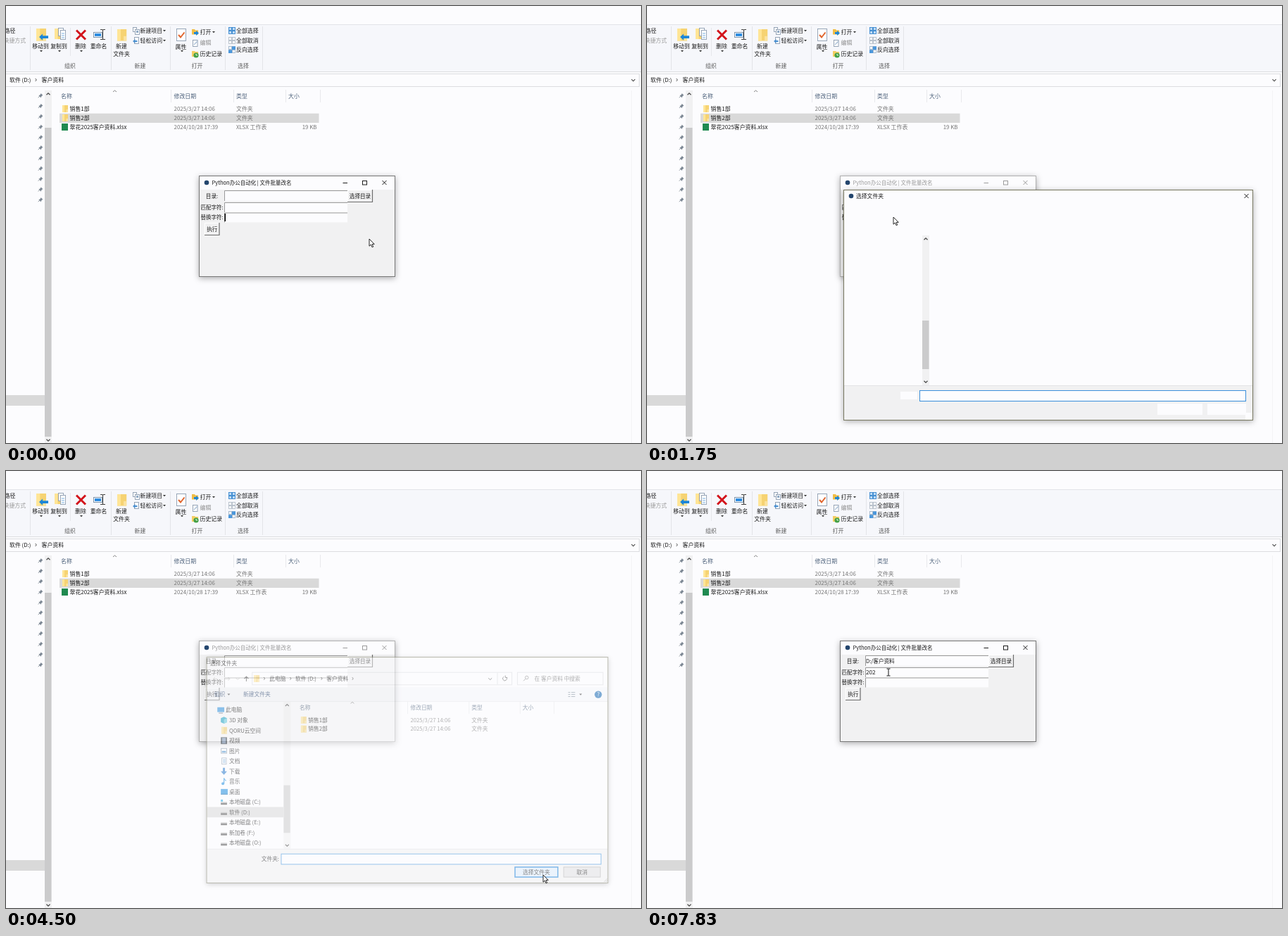
Animation of 902 by 621 pixels, one loop 8000 ms. Source, as an HTML page:

```html
<!DOCTYPE html>
<html lang="zh-CN">
<head>
<meta charset="utf-8">
<title>文件批量改名</title>
<style>
html, body { margin: 0; width: 100%; height: 100%; overflow: hidden; background: #fcfcfe; }
svg { display: block; width: 902px; height: 621px; }
text { font-family: "Noto Sans CJK SC", "Noto Sans CJK", "Noto Sans", sans-serif; white-space: pre; }
.shadow { filter: drop-shadow(0 2px 4px rgba(0, 0, 0, .32)); }
</style>
</head>
<body>
<svg id="stage" viewBox="0 0 902 621" xmlns="http://www.w3.org/2000/svg"></svg>
<script>
const LOOP = 8000, FPS = 12;
const WHITE = '#fcfcfe', INK = '#1b1b1b', GREY = '#757575', HEAD = '#4c607a',
      PANEL = '#f1f1f2', LINE = '#dcdde0', BLUE = '#1c86d8', PICKED = '#d9d9d9';

const rect = (x, y, w, h, fill, stroke = 'none', extra = '') =>
  `<rect x="${x}" y="${y}" width="${w}" height="${h}" fill="${fill}" stroke="${stroke}" ${extra}/>`;
const path = (d, stroke, width = 1, fill = 'none') =>
  `<path d="${d}" stroke="${stroke}" stroke-width="${width}" fill="${fill}"/>`;
const solid = (d, fill) => path(d, 'none', 0, fill);
const dot = (x, y, r, fill) => `<circle cx="${x}" cy="${y}" r="${r}" fill="${fill}"/>`;
// y is the visual middle of the line
const text = (x, y, s, fill = INK, size = 7.9, anchor = 'start') =>
  `<text x="${x}" y="${y + 2.9}" fill="${fill}" font-size="${size}" text-anchor="${anchor}">${s}</text>`;
const mid = (x, y, s, fill, size) => text(x, y, s, fill, size, 'middle');
const group = (id, body, cls = '') => `<g id="${id}" class="${cls}">${body}</g>`;
const vline = (x, y1, y2, color = LINE) => rect(x, y1, 1, y2 - y1, color);
const drop = (x, y, c = '#333') => solid(`M${x - 2} ${y - 1}h4l-2 2.2z`, c);
const chevron = (x, y, dx, dy, c = '#555', w = 1) =>
  path(dx ? `M${x - dx} ${y - 2}l${2 * dx} 2l${-2 * dx} 2` : `M${x - 2.5} ${y - dy}l2.5 ${2 * dy}l2.5 ${-2 * dy}`, c, w);
const cross = (x, y, r, c, w = 1) => path(`M${x - r} ${y - r}l${2 * r} ${2 * r}M${x + r} ${y - r}l${-2 * r} ${2 * r}`, c, w);
const folder = (x, y, k = 1) =>
  `<g transform="translate(${x} ${y}) scale(${k})">${rect(0, 0, 8, 10, '#f6d373')}${rect(0, 0, 3, 10, '#ffe596')}${rect(5.5, 6, 2.5, 4, '#fbe3a0')}</g>`;
const sheet = (x, y, w, h) => rect(x + .5, y + .5, w, h, '#fff', '#8d9cb0', 'stroke-width=".9"');

function scrollbar(x, top, bottom, thumbTop, thumbBottom) {
  return rect(x, top, 10, bottom - top, PANEL) + rect(x, thumbTop, 9.5, thumbBottom - thumbTop, '#cbcbcc') +
    chevron(x + 5, top + 5, 0, -1.2, '#444', 1.2) + chevron(x + 5, bottom - 5, 0, 1.2, '#444', 1.2);
}

function columns(dx, dy) {
  const heads = [[78, '名称'], [238.5, '修改日期'], [327, '类型'], [401, '大小']];
  return heads.map(([x, s]) => text(x + dx, 128 + dy, s, HEAD)).join('') +
    [234, 323, 397, 446].map(x => vline(x + dx, 119 + dy, 137 + dy, '#e8e9ec')).join('') +
    chevron(154.5 + dx, 121 + dy, 0, -1, '#777', .9);
}

function fileRow(dx, y, name, date, kind, size = '', isFolder = true) {
  return (isFolder ? folder(80 + dx, y - 5) : rect(79 + dx, y - 5, 9, 10, '#1f8a50')) +
    text(90.5 + dx, y, name) + text(238.5 + dx, y, date, GREY) +
    text(327 + dx, y, kind, GREY) + text(441.5 + dx, y, size, GREY, 7.9, 'end');
}
const folders = (dx, dy) => ['销售1部', '销售2部']
  .map((n, i) => fileRow(dx, 146 + dy + 13 * i, n, '2025/3/27 14:06', '文件夹')).join('');

function ribbon() {
  const grid = (x, y, c, fill) => [0, 1].map(i => [0, 1].map(j =>
    rect(x + i * 5 + .5, y + j * 5 + .5, 4, 4, fill, c, 'stroke-width=".9"')).join('')).join('');
  const icons =
    folder(43, 32, 1.75) + solid('M47 44l5-4.5v2.7h8v3.8h-8v2.7z', BLUE) +
    folder(69, 32, 1.5) + sheet(74, 31, 7, 11) + sheet(77, 34, 7, 13) +
    path('M79 39h4m-4 3h4m-4 3h4', '#6aa5dc', .9) +
    cross(106.5, 41, 6.5, '#d3141c', 3) +
    rect(124.5, 37.5, 12, 7, '#fff', '#7b93ab') + rect(126, 39, 9, 4, '#2c8be0') +
    path('M134 33.5h2.5q1 0 1 1v12q0 1-1 1H134M141 33.5h-2.5q-1 0-1 1m0 12q0 1 1 1H141', '#444', 1.1) +
    folder(158, 33, 1.65) +
    sheet(180, 30, 5, 6) + sheet(183, 33, 6, 7) + rect(185, 35, 3, 3, '#8fa9c4') +
    sheet(182, 44, 6, 9) + solid('M180 50l3.5-3v2h3v2h-3v2z', '#4a8fd0') +
    sheet(242, 32, 13, 17) + path('M245 41l3 3.5l5.5-7', '#e0642c', 2) +
    solid('M264 33h4l1 1.5h4v6h-9z', '#f0bd45') + solid('M267 40v-3h3v-2l4 3.5l-4 3.5v-2z', BLUE) +
    sheet(265, 48, 6.5, 9) + path('M267 55l5-5', '#a6bcd5', 1.3) +
    solid('M264 64h4l1 1h4v7h-9z', '#f3ce63') + dot(270, 70, 3.6, '#43a047') + path('M270 68v2h2', '#fff', .9) +
    grid(316, 30, '#3987cf', '#bfdcf5') + grid(316, 44, '#b4bdc8', '#fff') +
    grid(316, 57, '#9eb3c8', '#fff') + rect(321, 57.5, 5, 4.5, '#4b97dc') + rect(316, 62.5, 5, 4.5, '#4b97dc');
  const centred = [[49, 57, '移动到'], [75, 57, '复制到'], [106, 57, '删除'], [131.5, 57, '重命名'],
    [164, 57, '新建'], [164, 68, '文件夹'], [248.5, 58, '属性']];
  const sided = [[190.5, 35, '新建项目'], [190.5, 49, '轻松访问'], [275.5, 37, '打开'], [275.5, 68, '历史记录'],
    [327, 35, '全部选择'], [327, 49, '全部取消'], [327, 62, '反向选择'], [-2.5, 35, '路径']];
  return rect(0, 26, 902, 67, '#f6f7fb') + rect(0, 26, 902, 1, '#e2e3e8') + rect(0, 93, 902, 1, LINE) +
    [34, 149, 233, 311, 364].map(x => vline(x, 29, 91, '#e3e4e8')).join('') + vline(91, 31, 71, '#e6e7eb') + icons +
    centred.map(([x, y, s]) => mid(x, y, s)).join('') + sided.map(([x, y, s]) => text(x, y, s)).join('') +
    text(-3.5, 49, '快捷方式', '#9a9a9a') + text(275.5, 52, '编辑', '#8c8c8c') +
    [[91, '组织'], [190.5, '新建'], [271.5, '打开'], [337, '选择']].map(([x, s]) => mid(x, 85, s, '#5c5c5c')).join('') +
    [[50, 64], [76, 64], [107, 64], [250, 64], [225, 35], [225, 49], [295, 37]].map(([x, y]) => drop(x, y)).join('');
}

function explorer() {
  let pins = '';
  for (let i = 0; i < 11; i++) {
    const y = 127 + 14.8 * i;
    pins += solid(`M49.5 ${y - 3}l3 3l-1 .3l-1.5 1.7l-.3 1.5l-3.4-3.4l1.5-.3l1.6-1.8z`, '#7d8894') + path(`M47.8 ${y + 1.2}l-2 2`, '#7d8894', .9);
  }
  return ribbon() +
    rect(-1, 96.5, 900.5, 18, WHITE, LINE) + text(5, 105, '软件 (D:)') + chevron(42.5, 105, .9, 0) +
    text(50.5, 105, '客户资料') + chevron(891, 105.5, 0, 1.3, '#444', 1.1) +
    pins + rect(0, 553, 55, 15, PICKED) + scrollbar(55, 120, 622, 173, 612) + vline(888, 120, 621, '#f3f3f6') +
    columns(0, 0) + rect(76, 152.7, 368.5, 13.3, PICKED) + folders(0, 0) +
    fileRow(0, 172, '翠花2025客户资料.xlsx', '2024/10/28 17:39', 'XLSX 工作表', '19 KB', false);
}

function titleBar(id, color, border) {
  return group(id, rect(274.5, 241.5, 278, 143, 'none', border) +
    text(292.5, 251, 'Python办公自动化 | 文件批量改名', color, 7.5) +
    path('M478.5 251.5h6.5', color) + rect(506.5, 248.5, 6, 5.5, 'none', color) + cross(537.5, 251, 3, color));
}
function tkButton(id, x, y, w, h, label) {
  return rect(x, y, w, h, PANEL) +
    group(id, path(`M${x + .5} ${y + h}V${y + .5}H${x + w}`, '#fff') + path(`M${x} ${y + h - .5}H${x + w - .5}V${y}`, '#6d6d6d', 1.2)) +
    mid(x + w / 2, y + h / 2 - .2, label, INK, 7.6);
}
function toolWindow() {
  const entry = (y, h) => rect(310, y, 175, h, WHITE) + path(`M310.5 ${y + h}V${y + .5}H485`, '#9a9a9a');
  return rect(274, 241, 279, 144, PANEL, 'none', 'class="shadow"') + rect(275, 242, 277, 19, WHITE) +
    dot(285, 251, 3.3, '#24466e') + titleBar('titleOn', INK, '#777') + titleBar('titleOff', '#9b9b9b', '#b0b0b0') +
    entry(262, 15) + entry(279, 14) + entry(293.5, 14) +
    mid(292.5, 270, '目录:', INK, 7.6) + text(308.5, 286, '匹配字符:', INK, 7.5, 'end') + text(308.5, 300, '替换字符:', INK, 7.5, 'end') +
    tkButton('pick', 485, 261, 36, 18, '选择目录') + tkButton('run', 282, 308, 21.5, 18, '执行') +
    group('dir', text(311, 270, 'D:/客户资料', INK, 7.6)) +
    '<text id="typed" x="311" y="289" font-size="8.2" fill="#1b1b1b"></text>' +
    rect(310.5, 295, 1.5, 11, '#000', 'none', 'id="caretLow"') + rect(310.5, 281, 1.3, 11, '#000', 'none', 'id="caretTop"');
}

function tree() {
  const names = ['此电脑', '3D 对象', 'QORU云空间', '视频', '图片', '文档', '下载', '音乐', '桌面',
    '本地磁盘 (C:)', '软件 (D:)', '本地磁盘 (E:)', '新加卷 (F:)', '本地磁盘 (O:)'];
  const disk = rect(0, 1, 9, 3, '#4b4b4b') + rect(0, 0, 9, 1.5, '#b3b3b3');
  const icons = [
    rect(-5, -4, 10, 7, '#2f95e3') + rect(-3, 4, 6, 1, '#667'),
    solid('M4.5-5l4.5 2v6l-4.5 2l-4.5-2v-6z', '#1aa5c9') + solid('M4.5-1l4.5-2v6l-4.5 2z', '#68d0e4'),
    folder(1, -5),
    rect(0, -5, 9, 10, '#414b57') + rect(2, -4, 5, 8, '#7f99bb'),
    rect(.5, -3.5, 8, 7, '#fff', '#8a98a8') + rect(1.5, 0, 6, 2.5, '#4a91cc'),
    sheet(1, -5, 6.5, 9) + path('M3-2h4m-4 2h4m-4 2h4', '#5d9bd3', .9),
    solid('M3-5h3v5h3l-4.5 5l-4.5-5h3z', '#2578cc'),
    dot(3, 3, 2, '#178be0') + path('M4.6 3v-8q0 2 3 4', '#178be0', 1.2),
    rect(0, -4, 10, 8, '#178bdf') + rect(0, 3, 10, 1, '#0b5ca1'),
    disk + rect(0, -3.5, 3, 3, '#20a8e2'), disk, disk, disk, disk];
  return rect(280, 478.5, 111, 15, PICKED) + names.map((n, i) => {
    const y = 338 + 14.8 * i;
    return `<g transform="translate(300 ${y})">${icons[i]}</g>` + text(i ? 312 : 307, y, n);
  }).join('');
}

function dialogContent() {
  const NAVY = '#23406c';
  return path('M295 293h-6m2.5-2.5l-2.5 2.5l2.5 2.5M306 293h7m-2.5-2.5l2.5 2.5l-2.5 2.5', '#c6c6c6') +
    chevron(324.5, 293, 0, .8, '#c6c6c6') + path('M337 296.5v-7m-3 3l3-3l3 3', '#555', 1.1) +
    rect(345.5, 283.5, 376, 18, WHITE, LINE) + vline(700, 284, 301) + folder(348, 287.5) +
    [[363, 0], [401, 0], [446, 0], [491, 0]].map(([x]) => chevron(x, 292.5, .8, 0)).join('') +
    text(370.5, 292.5, '此电脑') + text(408, 292.5, '软件 (D:)') + text(453, 292.5, '客户资料') +
    chevron(690, 293, 0, 1.2) + path('M713.5 290.5a3 3 0 1 1-3.5-.8M712 288v3h3', '#555', .9) +
    rect(729.5, 283.5, 124, 18, WHITE, LINE) +
    '<circle cx="743" cy="291" r="2.3" fill="none" stroke="#777" stroke-width=".8"/>' + path('M741.3 292.8l-3 3', '#777', .9) +
    text(754, 292.5, '在 客户资料 中搜索', '#6c6c6c') +
    rect(280, 305, 581, 20, '#f6f7fb') + rect(280, 325, 581, 1, '#e4e5e9') +
    text(290.5, 315.5, '组织', NAVY) + drop(311.5, 315.5) + text(332.5, 315.5, '新建文件夹', NAVY) +
    path('M803 312.5h3m1.5 0h5.5M803 315.5h3m1.5 0h5.5M803 318.5h3m1.5 0h5.5', '#7c8b9a') + drop(821, 315.5) +
    dot(846.5, 315.5, 5.3, '#0c63b0') + mid(846.5, 315.5, '?', '#fff', 8) +
    columns(336, 206.5) + rect(412, 346, 368.5, 13, '#e5f3ff', 'none', 'id="hover"') + folders(336, 206.5) + tree();
}

function dialog() {
  const button = (x, w, s, id, fill, stroke, sw) =>
    rect(x, 565.5, w, 14.5, fill, stroke, `id="${id}" stroke-width="${sw}"`) + mid(x + w / 2, 573, s);
  return group('dialog',
    rect(279, 261, 582, 327.5, WHITE, 'none', 'class="shadow"') +
    group('dialogBadge', dot(290, 270, 3.3, '#24466e') + cross(851.5, 270, 3, INK)) +
    '<text id="dialogTitle" y="272.9" font-size="7.8" fill="#1b1b1b">选择文件夹</text>' +
    group('content', dialogContent()) +
    scrollbar(391, 326, 539, 447, 516) + rect(280, 539.5, 581, 48.5, PANEL) + rect(280, 539, 581, 1, '#e3e3e6') +
    rect(387.5, 546.5, 463, 15, WHITE, '#3a8fdb') + rect(389, 548, 1, 10, '#000', 'none', 'id="caretBox"') +
    group('blanks', rect(360, 548, 24, 11, WHITE) + rect(725, 565, 64, 16, WHITE) + rect(796, 565, 55, 16, WHITE) + rect(850, 578, 11, 10, WHITE)) +
    group('buttons', text(384.5, 554, '文件夹:', INK, 7.9, 'end') +
      button(726, 62, '选择文件夹', 'accept', '#e1e1e2', '#1a80d8', 1.6) + button(796.5, 53, '取消', 'cancel', '#e1e1e2', '#b0b0b0', 1) +
      path('M855 587l5-5m-2.5 5l2.5-2.5', '#b5b5b5')) +
    rect(279.5, 261.5, 581, 327, 'none', '#77775f'));
}

function pointers() {
  return group('cursor',
    group('arrow', path('M0 0V10.2L2.4 8L4.1 11.8L5.7 11.1L4.1 7.4H7.2Z', '#111', .9, '#fff')) +
    group('busy', '<circle r="4.6" fill="none" stroke="#1d80d6" stroke-width="3"/>' +
      '<path id="spark" d="M0-4.6A4.6 4.6 0 0 1 4.6 0" fill="none" stroke="#7cc4f5" stroke-width="2"/>') +
    group('beam', path('M-2.5-5h2q.5 0 .5.5v9q0 .5-.5.5h-2M2.5-5h-2q-.5 0-.5.5m0 9q0 .5.5.5h2', '#111')));
}

const stage = document.getElementById('stage');
stage.innerHTML = explorer() + toolWindow() + dialog() + pointers();
const el = Object.fromEntries([...stage.querySelectorAll('[id]')].map(n => [n.id, n]));

// time, x, y of the pointer's hot spot
const route = [[0, 516, 331], [750, 497, 273], [1000, 497, 273], [1420, 350, 300], [1750, 350, 300],
  [2330, 560, 364], [2830, 689, 480], [3170, 672, 360], [3420, 640, 293], [3500, 640, 293],
  [4250, 763, 574], [4660, 763, 574], [5080, 344, 299], [5330, 343, 286], [LOOP, 343, 286]];
// time, opacity, scale of the folder dialog
const fades = [[0, 0, .94], [1580, .4, .96], [1670, .85, .99], [1750, 1, 1], [4420, .82, .992], [4500, .52, .981], [4580, .18, .968], [4670, 0, .96]];

const between = (t, ...spans) => spans.some(([a, b]) => t >= a && t < b);
const show = (node, on) => node.setAttribute('display', on ? 'inline' : 'none');

function pointerAt(t) {
  const i = Math.max(1, route.findIndex(k => k[0] > t));
  const [t0, x0, y0] = route[i - 1], [t1, x1, y1] = route[i];
  const p = (t - t0) / (t1 - t0), e = p * p * (3 - 2 * p);
  return [x0 + (x1 - x0) * e, y0 + (y1 - y0) * e];
}

function render(time) {
  // the screen refreshes twelve times a second
  const t = Math.floor((time + 4) * FPS / 1000) * 1000 / FPS + 4;
  const [x, y] = pointerAt(Math.min(t - 4, LOOP - 1));
  const [, opacity, scale] = fades.filter(k => k[0] <= t).pop();

  el.cursor.setAttribute('transform', `translate(${x} ${y})`);
  const busy = between(t, [830, 1580]), beam = t >= 5170;
  show(el.busy, busy);
  show(el.beam, beam);
  show(el.arrow, !busy && !beam);
  el.spark.setAttribute('transform', `rotate(${t * .36})`);

  const active = !between(t, [1250, 4670]);
  show(el.titleOn, active);
  show(el.titleOff, !active);
  show(el.pick, !between(t, [670, 830]));
  show(el.dir, t >= 5170);
  el.typed.textContent = '202'.slice(0, [7420, 7580, 7830].filter(k => t >= k).length);
  show(el.caretLow, between(t, [0, 580], [4670, 5250], [5580, 6170]));
  show(el.caretTop, between(t, [6250, 6750], [7170, 7750]));
  el.caretTop.setAttribute('x', t >= 7580 ? 320 : t >= 7420 ? 315.4 : 310.5);

  show(el.dialog, opacity > 0);
  el.dialog.setAttribute('opacity', opacity);
  el.dialog.setAttribute('transform', `translate(570 424.7) scale(${scale}) translate(-570 -424.7)`);
  const closing = t >= 4420, loaded = t >= 1920;
  show(el.dialogBadge, !closing);
  el.dialogTitle.setAttribute('x', closing ? 284.5 : 297);
  show(el.content, loaded);
  show(el.buttons, loaded);
  show(el.blanks, !loaded);
  show(el.caretBox, between(t, [2000, 2500], [3080, 3580], [4080, 4420]));
  const row = Math.floor((y - 346) / 13);
  show(el.hover, x > 412 && x < 780 && (row === 0 || row === 1));
  el.hover.setAttribute('y', 346 + 13 * row);
  const over = x > 725 && x < 789 && y > 565;
  el.accept.setAttribute('fill', over ? '#dcecfb' : '#e1e1e2');
}

const start = performance.now();
function tick() {
  render((performance.now() - start) % LOOP);
  requestAnimationFrame(tick);
}
render(0);
requestAnimationFrame(tick);
</script>
</body>
</html>
```
